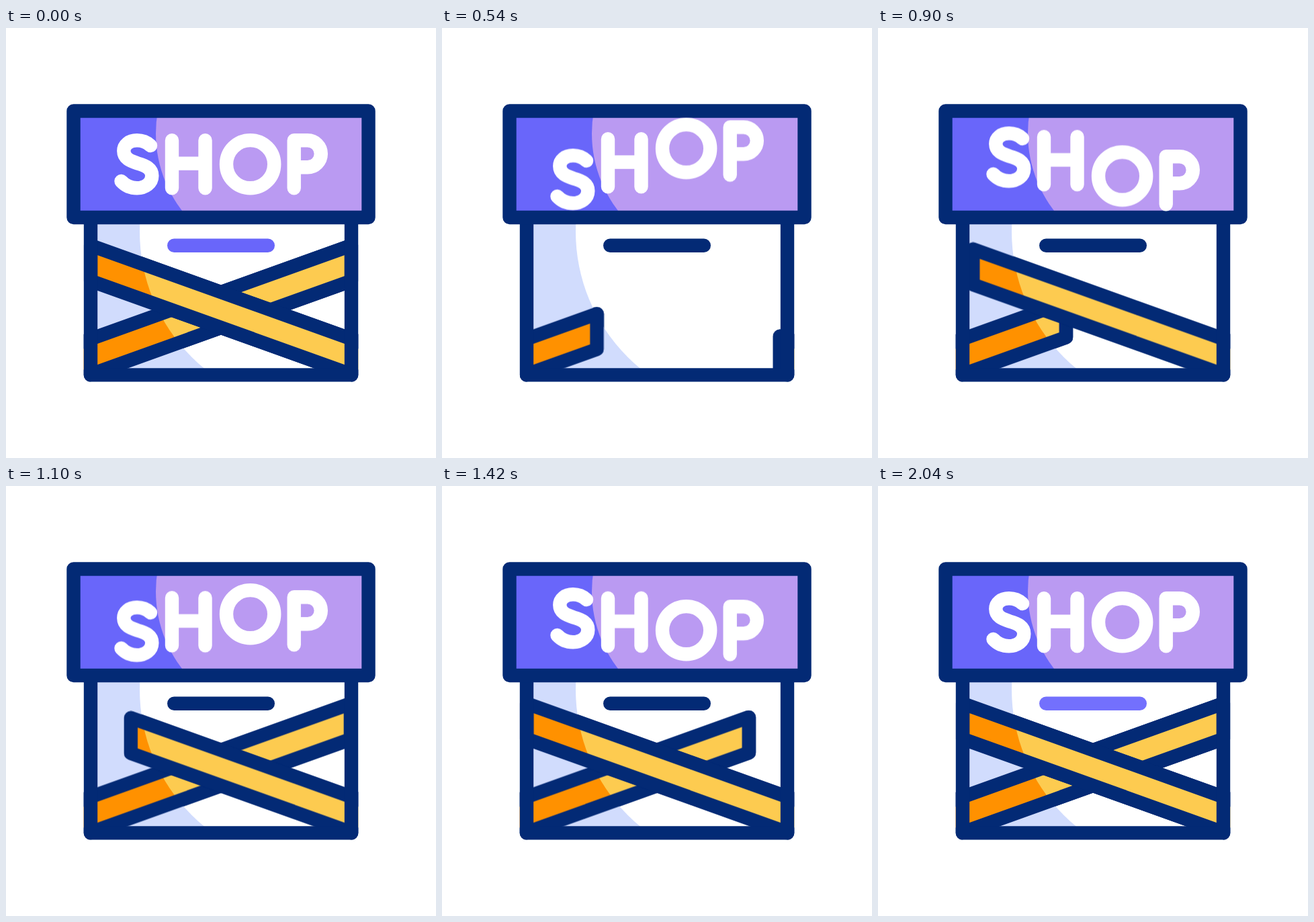
An HTML page without scripts for the animation above (2400 ms loop, 640 px wide and 640 px high).

```html
<!DOCTYPE html>
<html lang="en">
<head>
<meta charset="utf-8">
<title>Boarded-up shop</title>
<style>
  html, body { margin: 0; width: 100%; height: 100%; overflow: hidden; background: #fff; }
  svg { display: block; width: 100%; height: 100%; }
  :root { --navy: #032a75; --violet: #6966fa; --orange: #ff9100; --yellow: #fdcb50; }

  .line { fill: none; stroke: var(--navy); }
  .line, .plank, .letter, .bar {
    stroke-width: 20.4; stroke-linecap: round; stroke-linejoin: round;
  }
  .letter, .plank, .bar {
    animation: 2400ms cubic-bezier(.37, 0, .63, 1) var(--wait, 0ms) infinite;
  }
  .letter { fill: none; stroke: #fff; animation-name: hop; }
  .plank { stroke: var(--navy); animation-name: slide; }
  .bar { stroke: var(--violet); animation-name: tint; }
  .back { --wait: 140ms; }

  @keyframes hop {
    0%, 70%, 100% { transform: none; }
    11.667% { transform: translateY(-24px); }
    24.167% { transform: translateY(24.5px); }
    35.833% { transform: translateY(-12px); }
    46.875% { transform: translateY(14px); }
    58.333% { transform: translateY(-6px); }
  }
  /* each plank slides out along its own slope, returns, rebounds once */
  @keyframes slide {
    0%, .83%, 39.25%, 59.58%, 100% { transform: translate(0, 0); }
    25.21%, 25.92% { transform: translate(388px, 139.2px); }
    49.58% { transform: translate(83.4px, 29.9px); }
  }
  @keyframes tint {
    0%, 15% { stroke: var(--violet); }
    21.5%, 61% { stroke: var(--navy); }
    82.5%, 100% { stroke: #7370fd; }
  }
</style>
</head>
<body>
<svg viewBox="0 0 640 640">
  <defs>
    <path id="plank" d="M126 323.6L914 606.3V659L126 376.3Z"/>
    <clipPath id="room"><rect x="115.6" y="282" width="408.8" height="244.7" rx="10.2"/></clipPath>
    <clipPath id="sign"><rect x="100.5" y="123.5" width="439" height="158.5"/></clipPath>
    <clipPath id="lit"><circle cx="463" cy="303" r="264"/></clipPath>
  </defs>

  <g clip-path="url(#room)">
    <rect x="120" y="282" width="400" height="240" fill="#d1dcfd"/>
    <circle cx="463" cy="303" r="264" fill="#fff"/>
    <path class="bar" d="M250.2 323.8H389.8"/>

    <g class="back">
      <g transform="matrix(-1 0 0 1 640 0)">
        <use class="plank" href="#plank" fill="#ff9100"/>
      </g>
      <g clip-path="url(#lit)">
        <g transform="matrix(-1 0 0 1 640 0)">
          <use class="plank" href="#plank" fill="#fdcb50"/>
        </g>
      </g>
    </g>

    <g class="front">
      <use class="plank" href="#plank" fill="#ff9100"/>
      <g clip-path="url(#lit)">
        <use class="plank" href="#plank" fill="#fdcb50"/>
      </g>
    </g>
  </g>
  <path class="line" d="M126 282V516.4H514V282"/>

  <g clip-path="url(#sign)">
    <rect x="100" y="123" width="440" height="160" fill="#6966fa"/>
    <circle cx="412" cy="157" r="189" fill="#ba9af2"/>
  </g>
  <rect class="line" x="100.5" y="123.5" width="439" height="158.5"/>

  <path class="letter" d="M215 175C209 169.5 202 167.3 195 167.3C183 167.3 175.3 174 175.3 183C175.3 194 185 198 196 201.5C208 205 217.3 209 217.3 220C217.3 231 207 238.2 195 238.2C185 238.2 177 234 171.5 228"/>
  <path class="letter" style="--wait: 120ms" d="M247 167.3V238.2M296.5 167.3V238.2M247 201.6H296.5"/>
  <circle class="letter" style="--wait: 240ms" cx="363.6" cy="202.7" r="35.6"/>
  <path class="letter" style="--wait: 340ms" d="M428.7 238.2V167.3H448.8a20 20 0 0 1 0 40H428.7"/>
</svg>
</body>
</html>
```
